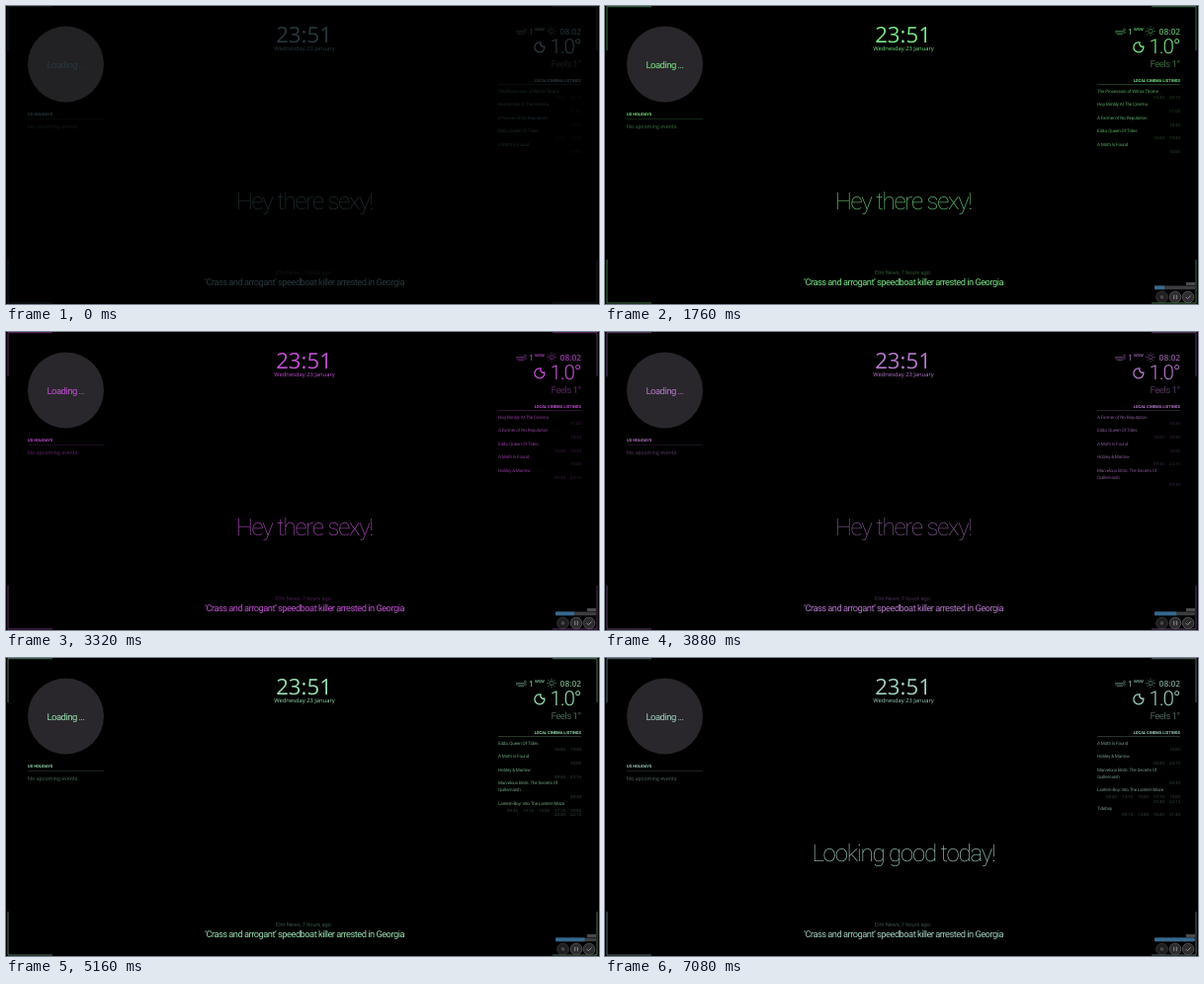
An HTML page that plays this animation: 600x302 px, repeating every 7.16 s.

```html
<!DOCTYPE html>
<html lang="en">
<head>
<meta charset="utf-8">
<title>Mirror dashboard</title>
<style>
html, body { margin: 0; width: 100%; height: 100%; overflow: hidden; background: #000; }
svg { display: block; width: 600px; height: 302px; color: #304248; animation: tint 7160ms linear infinite; }
text { fill: currentColor; font-family: Roboto, sans-serif; text-rendering: geometricPrecision; white-space: pre; }
.line { fill: none; stroke: currentColor; }
.wide { font-family: "Open Sans", "Noto Sans", sans-serif; }
.tight { letter-spacing: -.055em; }
.mid { text-anchor: middle; }
.end { text-anchor: end; }
.head { font-size: 4.05px; font-weight: 700; }
.big { font-size: 24px; font-weight: 100; letter-spacing: -.05em; }
.film { font-size: 4.6px; letter-spacing: -.035em; opacity: .72; }
.time { font-size: 4.3px; opacity: .36; }

#hello { animation: hello 7160ms infinite; }
#praise { animation: praise 7160ms infinite; }
#fill { transform-origin: 556px 0; animation: fill 7160ms linear infinite; }
#player { animation: show 7160ms step-end infinite; }

@keyframes tint {
  0% { color: #304248; opacity: .85; }
  10.6%, 24.6% { color: #78e486; opacity: 1; }
  36.3%, 41.3% { color: #cb32d8; }
  53%, 54.2% { color: #b478c8; }
  62.8%, 72.6% { color: #98deb0; }
  82.4%, 88% { color: #a4e2ec; }
  98.9%, 100% { color: #a0cfc0; opacity: 1; }
}
@keyframes hello {
  0%, 46% { opacity: .9; animation-timing-function: ease-in-out; }
  74%, 100% { opacity: 0; }
}
@keyframes praise {
  0%, 74% { opacity: 0; animation-timing-function: ease-in-out; }
  88%, 100% { opacity: 1; }
}
@keyframes fill { from { transform: scaleX(0); } to { transform: scaleX(1); } }
@keyframes show { 0% { opacity: 0; } 1.1%, 100% { opacity: 1; } }
</style>
</head>
<body>
<svg viewBox="0 0 600 302">
  <path class="line" opacity=".5" d="M2 45V.7H47M553 .7H598V45M2 257V301H47M553 301H598V257"/>

  <circle cx="60.5" cy="59" r="38.5" fill="#29272b"/>
  <text class="tight mid" x="60.5" y="62.5" font-size="9.5">Loading ...</text>

  <text class="head" x="22" y="111.2">US HOLIDAYS</text>
  <path class="line" stroke-width=".5" opacity=".35" d="M22 114.4H99"/>
  <text x="22" y="123.8" font-size="5.5" opacity=".45">No upcoming events.</text>

  <text class="wide mid" x="301.5" y="36.5" font-size="22.2">23:51</text>
  <text class="wide mid" x="302" y="45" font-size="5.8">Wednesday 23 January</text>

  <g class="line" stroke-width=".8" opacity=".6">
    <path d="M516 25.4H524Q527 25.4 526.4 23.8T524 24M516 27H527M518 28.7H524"/>
    <circle cx="552" cy="25.5" r="2.2"/>
    <path id="rays"/>
  </g>
  <text class="wide" x="529" y="29" font-size="8.4">1</text>
  <text class="wide" x="535" y="25.4" font-size="4" font-weight="600">WSW</text>
  <text class="wide end" x="582" y="29" font-size="8.4">08:02</text>
  <path class="line" stroke-width="1.3" d="M541 37A5 5 0 1 0 544.8 41A3 3 0 0 1 541 37Z"/>
  <text class="tight end" x="581.5" y="48" font-size="20.6" font-weight="300">1.0°</text>
  <text class="tight end" x="581.5" y="62" font-size="9.7" opacity=".45">Feels 1°</text>

  <text class="head end" x="582" y="77.3">LOCAL CINEMA LISTINGS</text>
  <path class="line" stroke-width=".5" opacity=".55" d="M498 79.6H582"/>
  <g id="films"></g>

  <text class="big mid" id="hello" x="302" y="206">Hey there sexy!</text>
  <text class="big mid" id="praise" x="302" y="206">Looking good today!</text>

  <text class="mid" x="301.5" y="272" font-size="5.7" letter-spacing="-.1" opacity=".38">Elm News, 7 hours ago:</text>
  <text class="tight mid" x="302" y="283" font-size="9.3">‘Crass and arrogant’ speedboat killer arrested in Georgia</text>

  <g id="player">
    <rect x="588" y="280" width="9" height="3" fill="#4a4a4c"/>
    <rect x="556" y="283.6" width="41" height="3.6" rx="1" fill="#3c3d40"/>
    <rect id="fill" x="556" y="283.6" width="41" height="3.6" rx="1" fill="#36698f"/>
    <g fill="#2c2c2e" stroke="#58585b" stroke-width=".8">
      <circle cx="563.5" cy="295" r="5.8" opacity=".7"/>
      <circle cx="577" cy="295" r="5.8"/>
      <circle cx="590" cy="295" r="5.8"/>
    </g>
    <rect x="561.9" y="293.4" width="3.2" height="3.2" fill="#4a4a4d"/>
    <path d="M575.7 292.8V297.2M578.3 292.8V297.2M587.6 295L589.4 296.8L592.6 293.4" fill="none" stroke="#8c8c90"/>
  </g>
</svg>
<script>
const LOOP = 7160, FADE = 120, SHOWN = 5;
const cuts = [0, 2200, 3600, 5000, 6400, LOOP];

// title lines, then lines of showing times
const films = [
  [["The Procession of Wilma Thorne"], ["13:45 20:15"]],
  [["Hop Bimbly At The Cinema"], ["11:00"]],
  [["A Farmer of No Reputation"], ["18:30"]],
  [["Edda, Queen Of Tides"], ["16:00 19:30"]],
  [["A Moth Is Found"], ["10:00"]],
  [["Hobley & Marrow"], ["09:45 23:15"]],
  [["Marvelous Birds: The Secrets Of", "Quillemarsh"], ["09:30"]],
  [["Lantern-Boy: Into The Lantern-Maze"], ["09:45 13:15 15:00 17:15 19:00", "20:30 22:15"]],
  [["Tideboy"], ["09:15 13:00 16:45 21:30"]]
];

function add(parent, tag, attrs, content = "") {
  const el = document.createElementNS("http://www.w3.org/2000/svg", tag);
  for (const key in attrs) el.setAttribute(key, attrs[key]);
  el.textContent = content;
  return parent.appendChild(el);
}

function listFrom(first) {
  const group = add(document.getElementById("films"), "g", {});
  let y = 87.6;
  for (const [title, times] of films.slice(first, first + SHOWN)) {
    for (const line of title) {
      add(group, "text", { class: "film", x: 498, y }, line);
      y += 6.8;
    }
    times.forEach((line, row) => {
      line.split(" ").reverse().forEach((time, i) =>
        add(group, "text", { class: "wide time end", x: 582 - 16 * i, y: y + 4.7 * row }, time));
    });
    y += 6.8 + 4.7 * (times.length - 1);
  }
  return group;
}

for (let i = 0; i < SHOWN; i++) {
  const start = cuts[i], stop = cuts[i + 1];
  const frames = [];
  const key = (ms, opacity) => frames.push({ offset: ms / LOOP, opacity });
  if (i > 0) {
    key(0, 0);
    key(start, 0);
    key(start + FADE, 1);
  } else key(0, 1);
  if (stop < LOOP) {
    key(stop - FADE, 1);
    key(stop, 0);
    key(LOOP, 0);
  } else key(LOOP, 1);
  listFrom(i).animate(frames, { duration: LOOP, iterations: Infinity });
}

const rays = Array.from({ length: 8 }, (_, i) => {
  const c = Math.cos(i * Math.PI / 4), s = Math.sin(i * Math.PI / 4);
  return `M${552 + 3.4 * c} ${25.5 + 3.4 * s}L${552 + 4.9 * c} ${25.5 + 4.9 * s}`;
});
document.getElementById("rays").setAttribute("d", rays.join(""));
</script>
</body>
</html>
```
